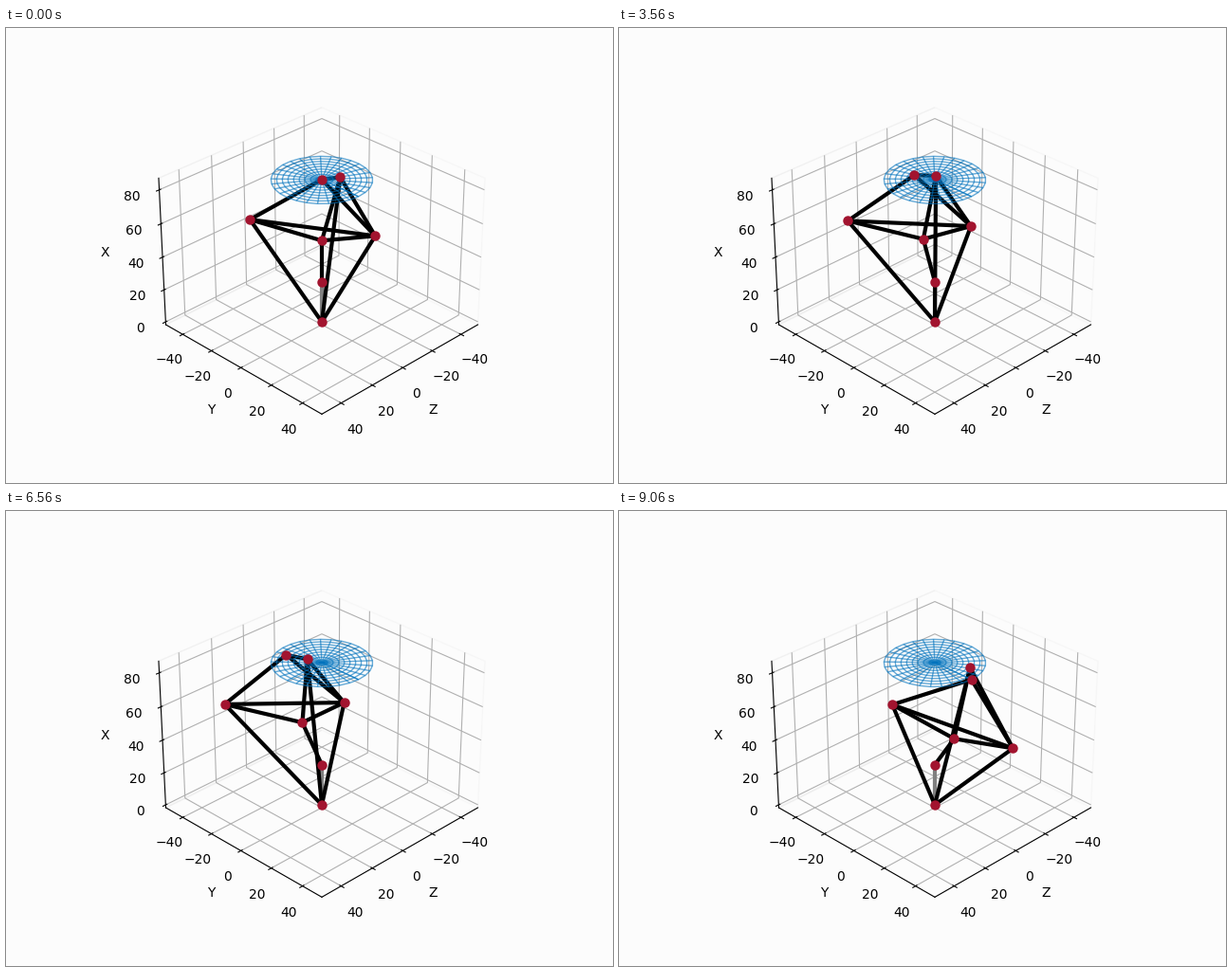
Recreate the animation shown at these times as a matplotlib script. Size 640 by 480 pixels, loop 9.16 s.

```python
import matplotlib.pyplot as plt
import numpy as np
from matplotlib.animation import FuncAnimation

# Timing in ms: a rest pose, then circles of growing radius
LOOP, INTERVAL = 9160, 40
REST, STEP = 160, 100
CIRCLES, POINTS = 9, 10

# Spatial inversor: pole at the origin, crank around PIVOT
CRANK = 25.0
HEIGHT = 86.0                     # plane traced by the tip
REACH = 23.0                      # largest circle in that plane
POWER = 2 * CRANK * HEIGHT        # |pole-inner| * |pole-tip|
RING = 33.6                       # elbow circle radius at rest
ARM2 = (CRANK + HEIGHT / 2) ** 2 + RING ** 2
CHORD = np.sqrt(3) * RING         # bars between neighbouring elbows

POLE = np.zeros(3)
PIVOT = np.array([0, 0, CRANK])
UP = np.array([0, 0, 1.0])
SIDE = np.array([0, 1.0, 0])

BG, BLUE, RED = "#fcfcfc", "#0072BD", "#A2142F"

# Joints: 0 pole, 1 pivot, 2 inner, 3 tip, 4-6 elbows
BARS = [(0, 4), (0, 5), (0, 6), (2, 4), (2, 5), (2, 6),
        (3, 4), (3, 5), (3, 6), (4, 5), (5, 6), (1, 2)]


def tip_at(t):
    if t < REST:
        return HEIGHT * UP
    circle, i = divmod(int((t - REST) // STEP), POINTS)
    r = REACH * (circle + 1) / CIRCLES
    a = 2 * np.pi * i / (POINTS - 1)
    return np.array([r * np.sin(a), r * np.cos(a), HEIGHT])


def joints(tip):
    dist = np.linalg.norm(tip)
    u = tip / dist
    inner = POWER / dist
    mid = (dist + inner) / 2
    radius = np.sqrt(ARM2 - mid ** 2)

    # Frame across the axis, tilted with it without twist
    e1 = SIDE - (u @ SIDE) / (1 + u[2]) * (u + UP)
    e2 = np.cross(e1, u)
    spread = 2 * np.arcsin(CHORD / (2 * radius))
    elbows = [mid * u + radius * (np.cos(a) * e1 + np.sin(a) * e2)
              for a in (spread, 0, -spread)]
    return np.array([POLE, PIVOT, inner * u, tip, *elbows])


def padded(lo, hi):
    pad = (hi - lo) / 48
    return lo - pad, hi + pad


fig = plt.figure(figsize=(6.4, 4.8), dpi=100, facecolor=BG)
ax = fig.add_subplot(projection="3d")
ax.set_facecolor(BG)
ax.view_init(elev=30, azim=45)
ax.set(xlim=padded(-50, 50), ylim=padded(-50, 50), zlim=padded(0, 85),
       xticks=range(-40, 41, 20), yticks=range(-40, 41, 20),
       zticks=range(0, 81, 20), xlabel="Z", ylabel="Y", zlabel="X")
for axis in (ax.xaxis, ax.yaxis, ax.zaxis):
    axis.pane.set_fill(False)

# Reachable disc
rr, aa = np.meshgrid(np.linspace(0, REACH, 10), np.linspace(0, 2 * np.pi, 30))
ax.plot_wireframe(rr * np.sin(aa), rr * np.cos(aa), np.full_like(rr, HEIGHT),
                  color=BLUE, alpha=0.6, linewidth=1)

ax.plot(*np.array([POLE, PIVOT]).T, color="gray", lw=3)
bars = [ax.plot([], [], [], color="black", lw=3)[0] for _ in BARS]
dots, = ax.plot([], [], [], "o", color=RED, ms=6, mew=1.5, zorder=10)


def update(n):
    p = joints(tip_at(n * INTERVAL + INTERVAL / 2))
    for line, ends in zip(bars, BARS):
        line.set_data_3d(*p[list(ends)].T)
    dots.set_data_3d(*p.T)
    return [*bars, dots]


anim = FuncAnimation(fig, update, frames=LOOP // INTERVAL, interval=INTERVAL,
                     init_func=lambda: update(0), repeat=True, repeat_delay=0)
plt.show()
```
